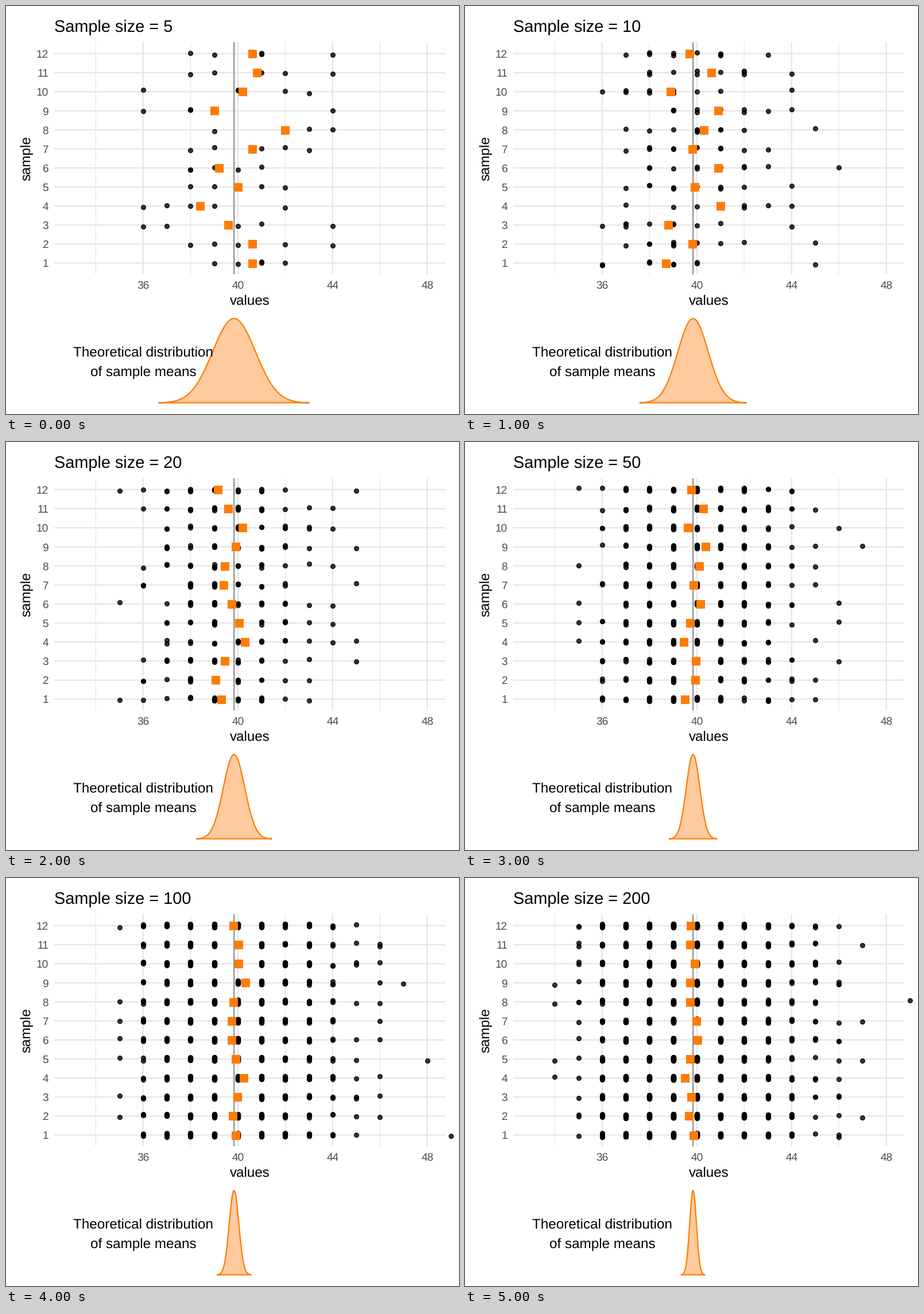
Write a matplotlib script that moves like this. It is 789 px wide and 710 px high and loops after 6000 ms.

```python
import matplotlib.pyplot as plt
import numpy as np
from matplotlib.animation import FuncAnimation

W, H, DPI = 789, 710, 100
PT = 72 / DPI                      # points per pixel
ORANGE, PEACH, GRID = "#FF7C03", "#FECA9E", "#E6E6E6"
LEFT, RIGHT, TOP, BOTTOM = 84, 765, 63, 467
MU, SD, SKEW = 39.84, 2.03, 0.06
UNIT, STEP = 41.24, 33.14          # pixels per value and per row
JITTER = 0.1 * STEP
BASE, PEAK = 690.8, 147
ROWS = np.arange(1, 13)

plt.rcParams["font.family"] = "Liberation Sans"
plt.rcParams["text.hinting"] = "none"

# Sample means by sample size, for samples 1 to 12.
MEANS = {
    5: [40.6, 40.6, 39.6, 38.4, 40, 39.2, 40.6, 42, 39, 40.2, 40.8, 40.6],
    10: [38.7, 39.8, 38.8, 41, 39.9, 40.9, 39.8, 40.3, 40.9, 38.9, 40.6, 39.7],
    20: [39.3, 39.05, 39.45, 40.3, 40.05, 39.75, 39.4, 39.45, 39.9, 40.2, 39.6, 39.15],
    50: [39.5, 39.94, 39.96, 39.44, 39.72, 40.14, 39.86, 40.1, 40.36, 39.62, 40.26, 39.76],
    100: [39.9, 39.78, 39.98, 40.24, 39.9, 39.75, 39.74, 39.82, 40.32, 40.02, 40.03, 39.82],
    200: [39.87, 39.66, 39.76, 39.49, 39.71, 40.04, 39.99, 39.71, 39.72, 39.9, 39.71, 39.73],
}
SIZES = list(MEANS)

normal = np.random.default_rng(1).normal(size=5000)
population = SD * (normal + SKEW * (normal ** 2 - 1))


def px(value):
    return 403.8 + UNIT * (value - 40)


def py(row):
    return 447.5 - STEP * (row - 1)


def draw_sample(n, mean, rng):
    """Whole-number sample of size n with the given mean."""
    share = (np.arange(n) + rng.random(n)) / n
    values = np.round(mean + np.quantile(population, share))
    miss = int(round(mean * n - values.sum()))
    nudged = rng.choice(n, min(abs(miss), n), replace=False)
    values[nudged] += np.sign(miss)
    return values


def scatter_rows(n):
    rng = np.random.default_rng(n)
    x = np.concatenate([draw_sample(n, mean, rng) for mean in MEANS[n]])
    y = py(np.repeat(ROWS, n)) + rng.uniform(-JITTER, JITTER, x.size)
    return np.column_stack([px(x), y])


def bell_curve(n):
    z = np.linspace(-3.5, 3.5, 161)
    x = px(MU) + z * SD * UNIT / np.sqrt(n)
    return np.column_stack([x, BASE - PEAK * np.exp(-z ** 2 / 2)])


fig = plt.figure(figsize=(W / DPI, H / DPI), dpi=DPI, facecolor="white")
ax = fig.add_axes([0, 0, 1, 1])
ax.set_xlim(0, W)
ax.set_ylim(H, 0)
ax.axis("off")


def line(x, y, color, width, z=1):
    ax.plot(x, y, color=color, lw=width * PT, zorder=z,
            solid_capstyle="butt", snap=False)


def label(x, y, text, size, color="black", ha="center", rotation=0):
    return ax.text(x, y, text, size=size * PT, color=color, ha=ha,
                   va="baseline", rotation=rotation,
                   rotation_mode="anchor", zorder=6)


for value in range(34, 49, 2):
    major = value % 4 == 0
    line([px(value)] * 2, [TOP, BOTTOM], GRID, 2.3 if major else 1.15)
    if major:
        label(px(value), 492.3, str(value), 19.2, "#4D4D4D")
for row in ROWS:
    line([LEFT, RIGHT], [py(row)] * 2, GRID, 2.3)
    label(74, py(row) + 7, str(row), 19.2, "#4D4D4D", "right")
line([px(MU)] * 2, [TOP, BOTTOM], "#8A8A8A", 2.1, 2)

title = label(84, 45.3, "", 28.9, ha="left")
label(424.5, 519.5, "values", 24.1)
label(42.2, 265, "sample", 24.1, rotation=90)
label(239, 609.3, "Theoretical distribution", 24.2)
label(239, 643.8, "of sample means", 24.2)

ink = (0, 0, 0, 0.8)
dots = ax.scatter([], [], s=(7.8 * PT) ** 2, color=[ink], edgecolors=[ink],
                  linewidths=1.4 * PT, zorder=3)
squares = ax.scatter([], [], s=(15 * PT) ** 2, marker="s", color=ORANGE,
                     linewidths=0, snap=False, zorder=4)
bell = plt.Polygon(bell_curve(SIZES[0]), closed=True, fc=PEACH, ec=ORANGE,
                   lw=2.2 * PT, joinstyle="round", zorder=5)
ax.add_patch(bell)


def update(i):
    n = SIZES[i]
    dots.set_offsets(scatter_rows(n))
    squares.set_offsets(np.column_stack([px(np.array(MEANS[n])), py(ROWS)]))
    bell.set_xy(bell_curve(n))
    title.set_text(f"Sample size = {n}")
    return dots, squares, bell, title


anim = FuncAnimation(fig, update, frames=len(SIZES), interval=1000,
                     init_func=lambda: update(0), repeat=True, repeat_delay=0)
plt.show()
```
